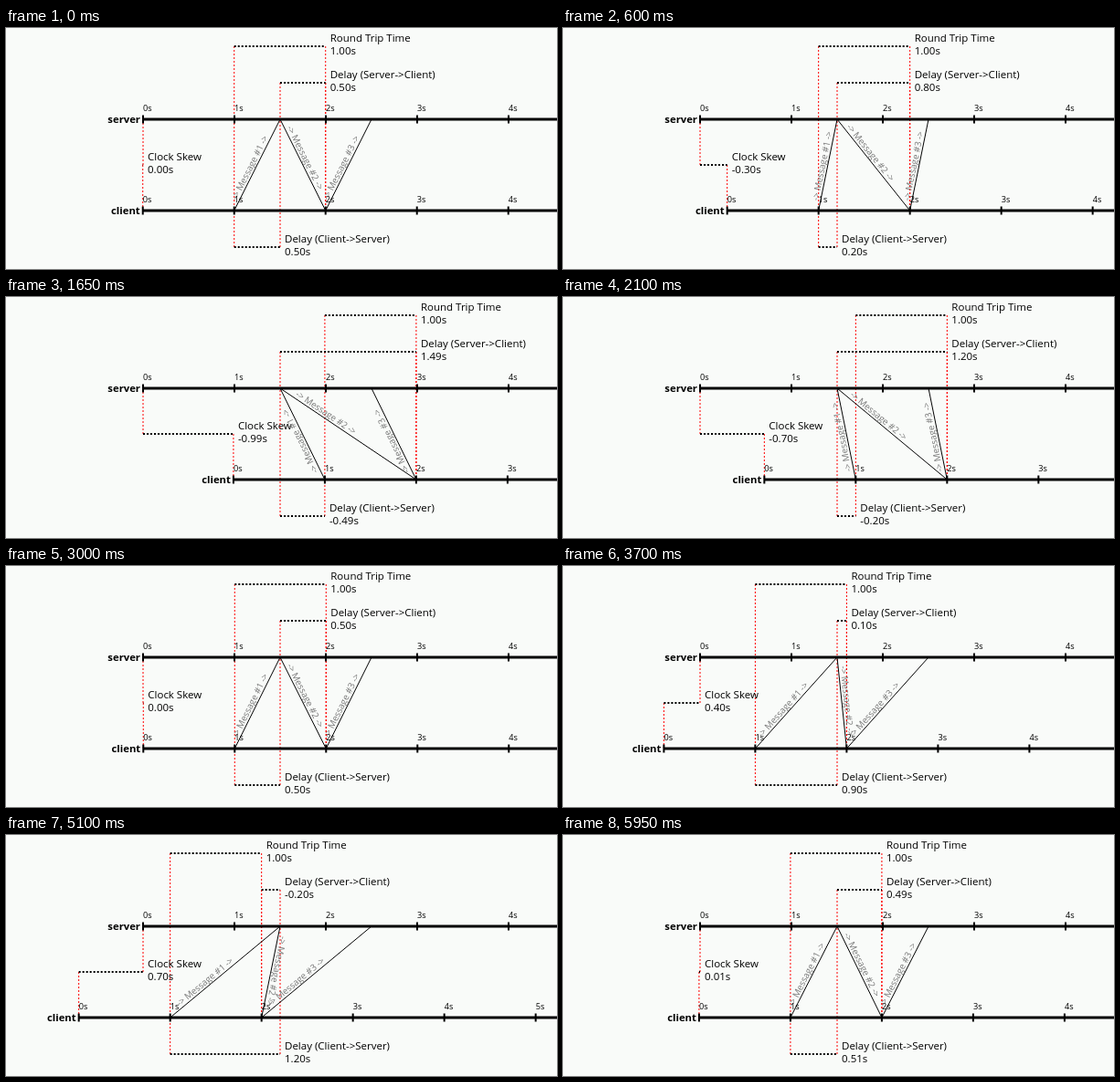
An HTML page that plays this animation: 603x264 px, repeating every 6 s.

```html
<!DOCTYPE html>
<html lang="en">
<head>
<meta charset="utf-8">
<title>Clock skew</title>
<style>
  html, body { margin: 0; width: 100%; height: 100%; overflow: hidden; background: #f9fbf9; }
  svg { display: block; width: 603px; height: 264px; font-family: "Open Sans", "Noto Sans", sans-serif; }
  .axis { stroke: #000; stroke-width: 3; }
  .tick { stroke: #000; stroke-width: 2; }
  .time { font-size: 9.2px; }
  .name { font-size: 11.3px; font-weight: 700; text-anchor: end; }
  .label { font-size: 11.5px; }
  .span { stroke: #000; stroke-width: 2; stroke-dasharray: 2 2; }
  .guide { stroke: #f00; stroke-dasharray: 2 2; }
  .arrow { stroke: #000; }
  .message { font-size: 9.8px; fill: #777; }
</style>
</head>
<body>
<svg id="stage" viewBox="0 0 603 264"></svg>
<script>
const LOOP = 6000, STEP = 50, SECOND = 100;
const ORIGIN = 150, SERVER_Y = 100, CLIENT_Y = 200;
const stage = document.getElementById('stage');

function add(tag, cls, attrs = {}, text = '', parent = stage) {
  const el = document.createElementNS('http://www.w3.org/2000/svg', tag);
  el.setAttribute('class', cls);
  set(el, attrs);
  el.textContent = text;
  parent.appendChild(el);
  return el;
}

function set(el, attrs) {
  for (const key in attrs) el.setAttribute(key, attrs[key]);
}

function place(line, x1, y1, x2, y2) {
  set(line, { x1, y1, x2, y2 });
}

function timeline(name, y) {
  const g = add('g', '');
  add('line', 'axis', { x1: ORIGIN, x2: 1150, y1: y, y2: y }, '', g);
  for (let s = 0; s <= 9; s++) {
    const x = ORIGIN + s * SECOND;
    add('line', 'tick', { x1: x, x2: x, y1: y - 4.5, y2: y + 4.5 }, '', g);
    add('text', 'time', { x, y: y - 9 }, s + 's', g);
  }
  add('text', 'name', { x: ORIGIN - 3, y: y + 4 }, name, g);
  return g;
}

// Dotted span at height y between two moments, with guides to their timelines.
function measure(title, y) {
  const a = add('line', 'guide');
  const b = add('line', 'guide');
  const span = add('line', 'span');
  const head = add('text', 'label', { y: y - 5 }, title);
  const value = add('text', 'label', { y: y + 9 });
  return (xa, ya, xb, yb, seconds) => {
    place(a, xa, y, xa, ya);
    place(b, xb, y, xb, yb);
    const right = Math.max(xa, xb);
    place(span, Math.min(xa, xb), y, right, y);
    set(head, { x: right + 5 });
    set(value, { x: right + 5 });
    value.textContent = seconds.toFixed(2).replace('-0.00', '0.00') + 's';
  };
}

function message(number) {
  const line = add('line', 'arrow');
  const text = add('text', 'message', { y: -2.5 }, `-> Message #${number} ->`);
  return (x1, y1, x2, y2) => {
    place(line, x1, y1, x2, y2);
    const angle = Math.atan2(y2 - y1, x2 - x1) * 180 / Math.PI;
    const x = x1 + (x2 - x1) * 0.1, y = y1 + (y2 - y1) * 0.1;
    set(text, { transform: `translate(${x} ${y}) rotate(${angle})` });
  };
}

const roundTrip = measure('Round Trip Time', 20);
const toClient = measure('Delay (Server->Client)', 60);
const clockSkew = measure('Clock Skew', 150);
const toServer = measure('Delay (Client->Server)', 240);
const messages = [1, 2, 3].map(message);
timeline('server', SERVER_Y);
const client = timeline('client', CLIENT_Y);

// Client offset in seconds: swings to +1 and back, then to -1 and back.
function offset(t) {
  const u = (t - 50 + LOOP) % LOOP;
  const swing = (1 - Math.cos(u / 1500 * Math.PI)) / 2;
  return u < LOOP / 2 ? swing : -swing;
}

function draw(t) {
  const skew = offset(t), d = skew * SECOND;
  const sent = 250 + d, received = 350 + d, reply = 300;

  set(client, { transform: `translate(${d} 0)` });
  roundTrip(sent, CLIENT_Y, received, CLIENT_Y, 1);
  toClient(reply, SERVER_Y, received, CLIENT_Y, 0.5 + skew);
  clockSkew(ORIGIN, SERVER_Y, ORIGIN + d, CLIENT_Y, -skew);
  toServer(reply, SERVER_Y, sent, CLIENT_Y, 0.5 - skew);
  messages[0](sent, CLIENT_Y, reply, SERVER_Y);
  messages[1](reply, SERVER_Y, received, CLIENT_Y);
  messages[2](received, CLIENT_Y, 400, SERVER_Y);
}

const start = performance.now();
function frame() {
  const t = (performance.now() - start) % LOOP;
  draw(Math.floor(t / STEP) * STEP);
  requestAnimationFrame(frame);
}
frame();
</script>
</body>
</html>
```
